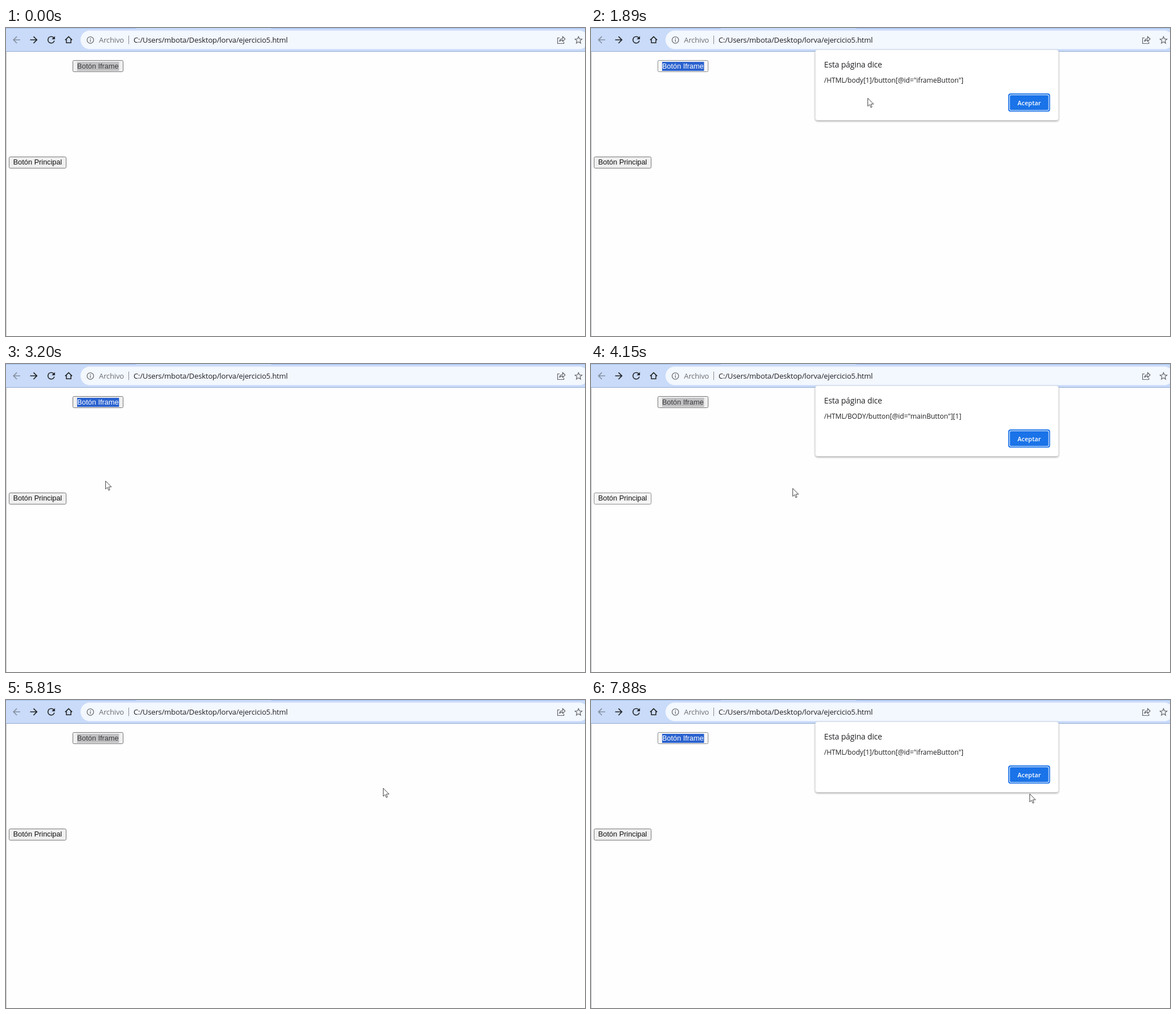
An HTML page that plays this animation: 1026x546 px, repeating every 8000 ms.

```html
<!DOCTYPE html>
<html lang="es">
<head>
<meta charset="utf-8">
<title>ejercicio5</title>
<style>
  html, body { margin: 0; width: 100%; height: 100%; overflow: hidden; background: #fefefe; }
  svg { display: block; width: 1026px; height: 546px; }
  text { white-space: pre; }
  .ui { font-family: "Open Sans", "Noto Sans", sans-serif; fill: #202124; }
  .url { font-size: 13.1px; letter-spacing: -.17px; }
  .btn { font: 12.85px "Liberation Sans", Arial, sans-serif; fill: #111; }
  .line { fill: none; stroke: #202124; stroke-width: 1.5; }
  .thin { fill: none; stroke: #5f6368; stroke-width: 1.2; }
  .face { fill: #efefef; stroke: #767676; }
  .face.hover { fill: #e5e5e5; stroke: #4f4f4f; }
  .face.active { fill: #f5f5f5; stroke: #8d8d8d; }
  #accept { fill: #1a73e8; }
  #accept.hover { fill: #2f7de1; }
</style>
</head>
<body>
<svg viewBox="0 0 1026 546">
  <defs>
    <filter id="shadow" x="-5%" y="-10%" width="110%" height="125%">
      <feDropShadow dx="0" dy="1.5" stdDeviation="1.6" flood-color="#000" flood-opacity=".36"/>
    </filter>
    <path id="arrow" d="M20 11H7.83l5.59-5.59L12 4l-8 8 8 8 1.41-1.41L7.83 13H20z"/>
  </defs>

  <!-- page -->
  <rect width="1026" height="546" fill="#fefefe"/>
  <path d="M.5 42V546" stroke="#bdbfc4"/>
  <rect id="frameBtn" class="face" x="118.5" y="57.5" width="89" height="20" rx="2"/>
  <rect id="selection" x="126" y="60" width="74.3" height="16"/>
  <text id="frameText" class="btn" x="126" y="72">Botón Iframe</text>
  <rect id="mainBtn" class="face" x="5.5" y="228.5" width="101" height="20" rx="2"/>
  <text class="btn" x="12.8" y="242">Botón Principal</text>

  <!-- toolbar -->
  <rect width="1026" height="42" fill="#c9dbf9"/>
  <path d="M0 .5H230M470 .5H1026" stroke="#a0bff4"/>
  <path d="M0 41.5H1026" stroke="#8fa9d3"/>
  <rect x="132" y="4.5" width="900" height="33" rx="16.5" fill="#f3f7fe"/>
  <use href="#arrow" transform="translate(8.8 11.2) scale(.82)" fill="#858f9f"/>
  <use href="#arrow" transform="translate(59.2 11.2) scale(-.82 .82)" fill="#202124"/>
  <path transform="translate(70.3 11.1) scale(.82)" fill="#202124" d="M17.65 6.35A7.96 7.96 0 0 0 12 4a8 8 0 1 0 7.73 10h-2.08A6 6 0 1 1 12 6c1.66 0 3.14.69 4.22 1.78L13 11h7V4z"/>
  <path class="line" d="M104.8 21.4 111 15.4 117.2 21.4M107 19.8V26.3H115V19.8"/>
  <circle class="thin" cx="149.5" cy="21.3" r="5.8"/>
  <path class="thin" d="M149.5 20.3V24.6M149.5 17.8V19.2"/>
  <text class="ui url" x="164.8" y="25.8" style="fill:#6b7075">Archivo</text>
  <path d="M217.5 13.5V28.5" stroke="#868a90"/>
  <text class="ui url" x="226" y="25.8">C:/Users/mbota/Desktop/lorva/ejercicio5.html</text>
  <path class="thin" d="M981 17.5H977.5V27.5H988.5V24.5M980.8 24C981.2 20.6 983.4 18.6 986.4 18.5V15.3L990.8 19.6 986.4 23.8V21.2C983.8 21.2 982.2 22 980.8 24Z"/>
  <path class="thin" d="M1014.5 15.2 1016.2 19.3 1020.6 19.7 1017.3 22.6 1018.3 26.9 1014.5 24.6 1010.7 26.9 1011.7 22.6 1008.4 19.7 1012.8 19.3Z"/>

  <g id="dialog">
    <rect x="397.5" y="38.5" width="431" height="125" rx="4" fill="#fff" stroke="#d5d7da" stroke-width=".6" filter="url(#shadow)"/>
    <text class="ui" x="413" y="69.9" font-size="14" letter-spacing="-.14">Esta página dice</text>
    <text id="message" class="ui" x="413" y="96.8" font-size="12.2" letter-spacing="-.08"></text>
    <rect x="739.3" y="116" width="74.2" height="32.3" rx="4" fill="#1a73e8"/>
    <rect x="741.2" y="117.9" width="70.4" height="28.5" rx="3" fill="#fff"/>
    <rect id="accept" x="742.2" y="118.9" width="68.4" height="26.5" rx="2.2"/>
    <text class="ui" x="776.5" y="136.5" font-size="11" font-weight="600" text-anchor="middle" style="fill:#fff">Aceptar</text>
  </g>

  <path id="cursor" d="M.5.5V14.7L3.7 11.7 5.9 16.9 8 16 5.9 10.9H10.8Z" fill="#fff" stroke="#3c3c3c" stroke-width=".95" stroke-linejoin="round"/>
</svg>

<script>
const LOOP = 8000, STEP = 70, FADE = 210;
const $ = id => document.getElementById(id);
const clamp = v => Math.max(0, Math.min(1, v));
const easeOut = v => 1 - (1 - v) ** 2;

// The pointer rests between moves: start, end, destination x, y
const entry = { time: 190, x: 800, y: 472 };
const moves = [
  [190, 960, 182, 60],
  [1820, 1890, 490, 124], [1890, 2450, 780, 140],
  [2860, 3200, 176, 207], [3200, 3480, 70, 238],
  [3890, 4150, 357, 220], [4150, 4360, 390, 180], [4430, 4920, 729, 148], [5120, 5320, 778, 143],
  [5740, 6540, 121, 222], [6540, 6710, 157, 90], [6780, 6850, 174, 70],
  [7390, 7880, 777, 166]
];

const frameAlert = '/HTML/body[1]/button[@id="iframeButton"]';
const mainAlert = '/HTML/BODY/button[@id="mainButton"][1]';
const clicks = [
  { press: 1290, close: 2700, button: 'frameBtn', text: frameAlert },
  { press: 3610, close: 5520, button: 'mainBtn', text: mainAlert },
  { press: 6880, close: Infinity, button: 'frameBtn', text: frameAlert }
];

function pointerAt(t) {
  let { x, y } = entry;
  for (const [start, end, toX, toY] of moves) {
    if (t < start) break;
    const done = t >= end ? 1 : Math.floor((t - start) / STEP) * STEP / (end - start);
    const k = easeOut(done);
    x += (toX - x) * k;
    y += (toY - y) * k;
  }
  return [Math.round(x), Math.round(y)];
}

function inside(rect, x, y) {
  const [left, top, w, h] = ['x', 'y', 'width', 'height'].map(a => +rect.getAttribute(a));
  return x >= left && x <= left + w && y >= top && y <= top + h;
}

function draw(t) {
  const [x, y] = pointerAt(t);
  const visible = t >= entry.time;
  const last = clicks.filter(c => t >= c.press).pop();
  const open = last && t < last.close + FADE;

  $('cursor').setAttribute('transform', `translate(${x} ${y})`);
  $('cursor').style.display = visible ? '' : 'none';

  for (const id of ['frameBtn', 'mainBtn']) {
    const pressed = open && last.button === id;
    $(id).classList.toggle('active', !!pressed);
    $(id).classList.toggle('hover', visible && !open && inside($(id), x, y));
  }

  const focused = last && last.button === 'frameBtn';
  $('selection').setAttribute('fill', focused ? '#2a62cf' : '#c1c1c3');
  $('frameText').style.fill = focused ? '#fff' : '#38383a';

  let shown = 0;
  if (open) {
    const enter = clamp((t - last.press - STEP) / FADE);
    const leave = clamp((t - last.close) / FADE);
    shown = easeOut(enter) * (1 - leave);
    $('message').textContent = last.text;
  }
  $('dialog').style.display = shown > 0 ? '' : 'none';
  $('dialog').setAttribute('opacity', shown);
  $('dialog').setAttribute('transform', `translate(0 ${-16 * (1 - shown)})`);
  $('accept').classList.toggle('hover', shown > 0 && inside($('accept'), x, y));
}

const begin = performance.now();
function tick() {
  draw((performance.now() - begin) % LOOP);
  requestAnimationFrame(tick);
}
tick();
</script>
</body>
</html>
```
